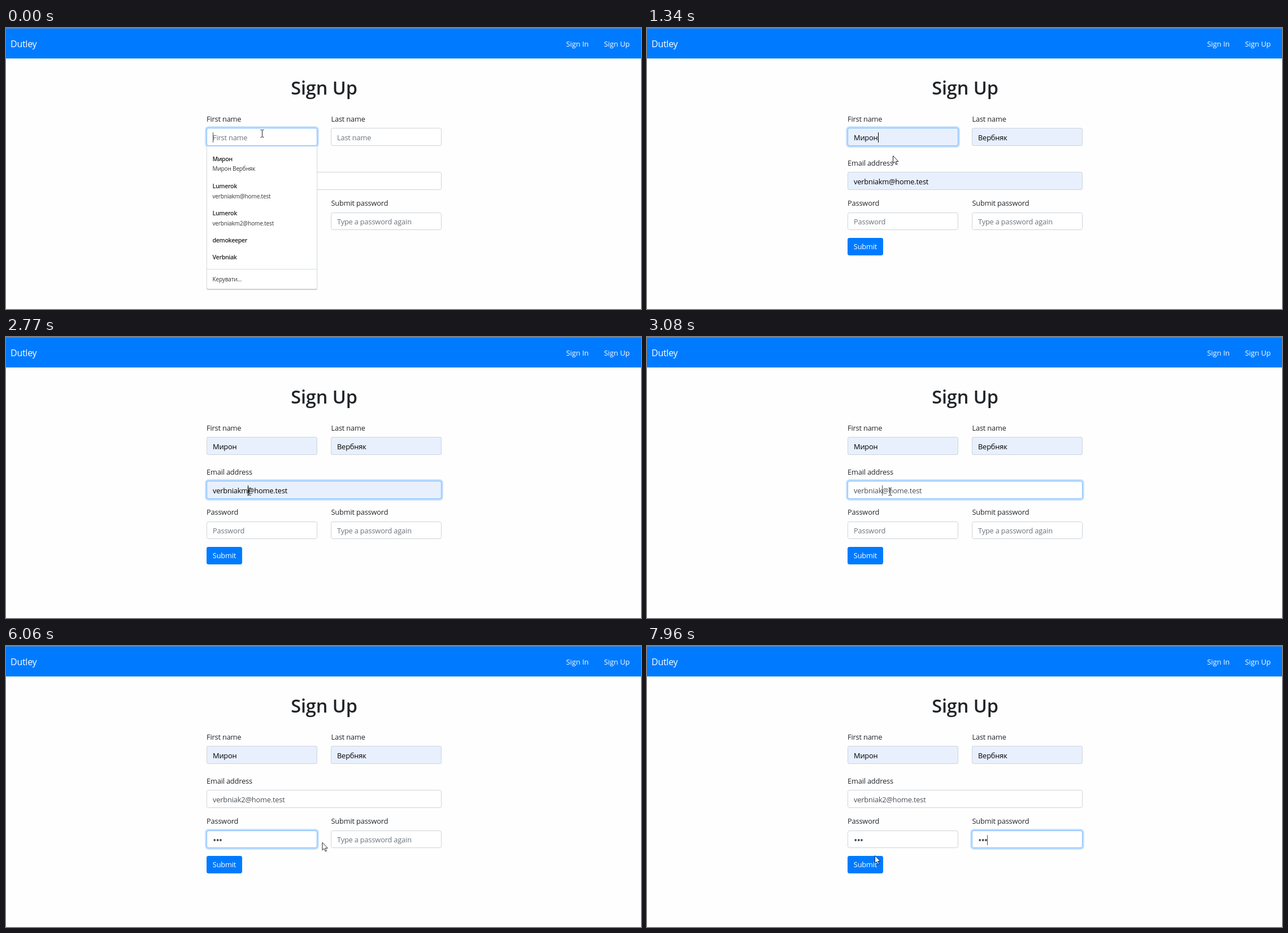
Animation, 1124 px wide and 498 px high, one loop 8000 ms. Source, as an HTML page:

```html
<!DOCTYPE html>
<html lang="en">
<head>
<meta charset="utf-8">
<title>Sign Up</title>
<style>
  html, body { margin: 0; width: 100%; height: 100%; overflow: hidden; }
  body {
    position: relative; background: #fefefe; color: #212529;
    font: 12.8px/20px "Open Sans", "Noto Sans", sans-serif; letter-spacing: -.17px;
  }
  body * { box-sizing: border-box; }

  /* Text lines: --x is the left edge, --y the middle */
  .line {
    position: absolute; left: var(--x); top: var(--y); margin: -10px 0 0;
    white-space: pre; font-weight: 400;
  }
  .anim, .caret { animation: var(--a) 8s step-end infinite; }

  nav {
    position: absolute; inset: 0 0 auto; height: 54px; color: #fff;
    background: #007bff; border-top: 1px solid #6a8fb8; letter-spacing: 0;
  }
  nav .line { margin-top: -11px; font-weight: 500; }
  .brand { font-size: 15.9px; letter-spacing: -.2px; }
  h1.line {
    left: 0; width: 1126px; text-align: center; font-size: 32.5px;
    font-weight: 600; letter-spacing: -.1px;
  }

  .field {
    position: absolute; left: var(--x); top: var(--y); width: 196px; height: 32px;
    border: 1px solid #ced4da; border-radius: 3.4px; background: #fff;
    color: #495057; line-height: 32px;
  }
  .wide { width: 416px; }
  .low { height: 31px; line-height: 31px; }
  .ring, .fill { position: absolute; inset: -1px; border-radius: 3.4px; }
  .ring { border: 1px solid #80bdff; box-shadow: 0 0 0 2.7px rgba(0, 123, 255, .25); }
  .fill { border: 1px solid #ced4da; background: #e8f0fe; }
  .text { position: absolute; left: 10px; top: 0; white-space: pre; }
  .hint { color: #6c757d; }
  .auto { color: #000; }
  .dots { font-size: 17px; letter-spacing: -1px; }
  .caret { display: inline-block; position: relative; width: 0; height: 0; }
  .caret::before {
    content: ""; position: absolute; left: 0; bottom: -4px;
    width: 1px; height: 18px; background: currentColor;
  }
  .hint .caret { color: #495057; }
  .dots .caret::before { bottom: -3px; }

  .button {
    position: absolute; left: 355px; top: 372px; width: 63px; height: 31px;
    border-radius: 3.4px; background: #007bff; color: #fff;
    font-weight: 500; line-height: 31px; text-align: center;
  }

  .menu {
    position: absolute; left: 355px; top: 210px; width: 196px; height: 253px;
    background: #fff; border: solid #d9dbde; border-width: 0 1px 1px;
    border-radius: 0 0 3px 3px; box-shadow: 0 1px 1px rgba(0, 0, 0, .25);
  }
  .menu .line { left: 9.5px; font-size: 10px; letter-spacing: -.15px; color: #333; }
  .menu b.line { font-size: 10.6px; font-weight: 600; letter-spacing: -.3px; color: #222; }
  .menu hr { position: absolute; left: 0; right: 0; top: 217px; margin: 0; border: 0; border-top: 1px solid #d9dbde; }
  .hover { position: absolute; inset: 6px 0 auto; height: 48px; background: #eee; }

  .cursor {
    position: absolute; left: 0; top: 0; width: 1px; height: 1px; overflow: visible;
    animation: move 8s step-end infinite;
  }
  .beam { fill: none; stroke: #222; }
  .arrow { fill: #fff; stroke: #222; stroke-linejoin: round; }

  @keyframes move {
    0% { transform: translate(453px, 187px); }
    9.25% { transform: translate(453px, 187px); animation-timing-function: steps(4, jump-both); }
    16.7%, 18.375% { transform: translate(435px, 226px); }
    18.375% { animation-timing-function: steps(2, jump-both); }
    21.75% { transform: translate(436px, 236px); }
    23.625% { transform: translate(436px, 236px); animation-timing-function: steps(5, jump-both); }
    32.7% { transform: translate(429px, 273px); }
    34.6% { transform: translate(430px, 274px); }
    50.875% { transform: translate(430px, 274px); animation-timing-function: steps(4, jump-both); }
    57.5% { transform: translate(417px, 332px); }
    72% { transform: translate(417px, 332px); animation-timing-function: steps(3, jump-both); }
    77.5% { transform: translate(607px, 353px); }
    91.875% { transform: translate(607px, 353px); animation-timing-function: steps(4, jump-both); }
    99.45%, 100% { transform: translate(403px, 371px); }
  }
  @keyframes beam {
    0%, 29.1%, 57.5%, 77.5% { opacity: 1; }
    13%, 52.5%, 75.65%, 91.875%, 100% { opacity: 0; }
  }
  @keyframes arrow {
    0%, 29.1%, 57.5%, 77.5% { opacity: 0; }
    13%, 52.5%, 75.65%, 91.875%, 100% { opacity: 1; }
  }

  /* Autofill and its menu */
  @keyframes menu { 0% { opacity: 1; } 14.8%, 100% { opacity: 0; } }
  @keyframes hover { 0% { opacity: 0; } 13%, 100% { opacity: 1; } }
  @keyframes filled { 0% { opacity: 0; } 14.8%, 100% { opacity: 1; } }

  /* Focus */
  @keyframes ring-first { 0% { opacity: 1; } 34.6%, 100% { opacity: 0; } }
  @keyframes ring-email { 0%, 59.2%, 100% { opacity: 0; } 34.6% { opacity: 1; } }
  @keyframes ring-pass { 0%, 79.25%, 100% { opacity: 0; } 59.2% { opacity: 1; } }
  @keyframes ring-again { 0% { opacity: 0; } 79.25%, 100% { opacity: 1; } }

  /* Carets */
  @keyframes caret-first {
    0%, 9.25%, 27.25% { opacity: 1; }
    1.875%, 20%, 32.7%, 100% { opacity: 0; }
  }
  @keyframes caret-email { 0%, 50.875%, 100% { opacity: 0; } 32.7% { opacity: 1; } }
  @keyframes caret-pass { 0%, 72%, 100% { opacity: 0; } 57.5% { opacity: 1; } }
  @keyframes caret-again { 0%, 91.875% { opacity: 0; } 77.5%, 97.5%, 100% { opacity: 1; } }

  /* Typing */
  @keyframes email-full { 0%, 38.45%, 100% { opacity: 0; } 14.8% { opacity: 1; } }
  @keyframes email-cut { 0%, 43.5%, 100% { opacity: 0; } 38.45% { opacity: 1; } }
  @keyframes email-new { 0% { opacity: 0; } 43.5%, 100% { opacity: 1; } }
  @keyframes pass-none { 0% { opacity: 1; } 63%, 100% { opacity: 0; } }
  @keyframes pass-two { 0%, 64.875%, 100% { opacity: 0; } 63% { opacity: 1; } }
  @keyframes pass-three { 0% { opacity: 0; } 64.875%, 100% { opacity: 1; } }
  @keyframes again-none { 0% { opacity: 1; } 81%, 100% { opacity: 0; } }
  @keyframes again-one { 0%, 82.75%, 100% { opacity: 0; } 81% { opacity: 1; } }
  @keyframes again-two { 0%, 84.45%, 100% { opacity: 0; } 82.75% { opacity: 1; } }
  @keyframes again-three { 0% { opacity: 0; } 84.45%, 100% { opacity: 1; } }
</style>
</head>
<body>
  <nav>
    <span class="line brand" style="--x:8px; --y:28px">Dutley</span>
    <span class="line" style="--x:991.5px; --y:28px">Sign In</span>
    <span class="line" style="--x:1058.5px; --y:28px">Sign Up</span>
  </nav>
  <h1 class="line" style="--y:105.5px">Sign Up</h1>

  <span class="line" style="--x:355px; --y:161px">First name</span>
  <div class="field" style="--x:355px; --y:177px">
    <div class="fill anim" style="--a:filled"></div>
    <div class="ring anim" style="--a:ring-first"></div>
    <div class="text hint anim" style="--a:menu"><i class="caret" style="--a:caret-first"></i>First name</div>
    <div class="text auto anim" style="--a:filled">Мирон<i class="caret" style="--a:caret-first"></i></div>
  </div>

  <span class="line" style="--x:575.5px; --y:161px">Last name</span>
  <div class="field" style="--x:575px; --y:177px">
    <div class="fill anim" style="--a:filled"></div>
    <div class="text hint anim" style="--a:menu">Last name</div>
    <div class="text auto anim" style="--a:filled">Вербняк</div>
  </div>

  <span class="line" style="--x:355px; --y:239px">Email address</span>
  <div class="field wide" style="--x:355px; --y:255px">
    <div class="fill anim" style="--a:email-full"></div>
    <div class="ring anim" style="--a:ring-email"></div>
    <div class="text auto anim" style="--a:email-full">verbniakm<i class="caret" style="--a:caret-email"></i>@home.test</div>
    <div class="text anim" style="--a:email-cut">verbniak<i class="caret" style="--a:caret-email"></i>@home.test</div>
    <div class="text anim" style="--a:email-new">verbniak2<i class="caret" style="--a:caret-email"></i>@home.test</div>
  </div>

  <span class="line" style="--x:355px; --y:310px">Password</span>
  <div class="field low" style="--x:355px; --y:327px">
    <div class="ring anim" style="--a:ring-pass"></div>
    <div class="text hint anim" style="--a:pass-none"><i class="caret" style="--a:caret-pass"></i>Password</div>
    <div class="text dots anim" style="--a:pass-two">••<i class="caret" style="--a:caret-pass"></i></div>
    <div class="text dots anim" style="--a:pass-three">•••<i class="caret" style="--a:caret-pass"></i></div>
  </div>

  <span class="line" style="--x:575.5px; --y:310px">Submit password</span>
  <div class="field low" style="--x:575px; --y:327px">
    <div class="ring anim" style="--a:ring-again"></div>
    <div class="text hint anim" style="--a:again-none"><i class="caret" style="--a:caret-again"></i>Type a password again</div>
    <div class="text dots anim" style="--a:again-one">•<i class="caret" style="--a:caret-again"></i></div>
    <div class="text dots anim" style="--a:again-two">••<i class="caret" style="--a:caret-again"></i></div>
    <div class="text dots anim" style="--a:again-three">•••<i class="caret" style="--a:caret-again"></i></div>
  </div>

  <div class="button">Submit</div>

  <div class="menu anim" style="--a:menu">
    <div class="hover anim" style="--a:hover"></div>
    <b class="line" style="--y:21.5px">Мирон</b>
    <span class="line" style="--y:39px">Мирон Вербняк</span>
    <b class="line" style="--y:70px">Lumerok</b>
    <span class="line" style="--y:87.5px">verbniakm@home.test</span>
    <b class="line" style="--y:118px">Lumerok</b>
    <span class="line" style="--y:135.5px">verbniakm2@home.test</span>
    <b class="line" style="--y:166px">demokeeper</b>
    <b class="line" style="--y:196px">Verbniak</b>
    <hr>
    <span class="line" style="--y:235px">Керувати...</span>
  </div>

  <svg class="cursor">
    <path class="beam anim" style="--a:beam" d="M-2.5 -6.5h2.5M1 -6.5h2.5M.5 -6v12M-2.5 6.5h2.5M1 6.5h2.5"/>
    <path class="arrow anim" style="--a:arrow" d="M.5 .5v13.5l3-2.8 2.3 5 2.1-.9-2.2-4.8h4.2z"/>
  </svg>
</body>
</html>
```
